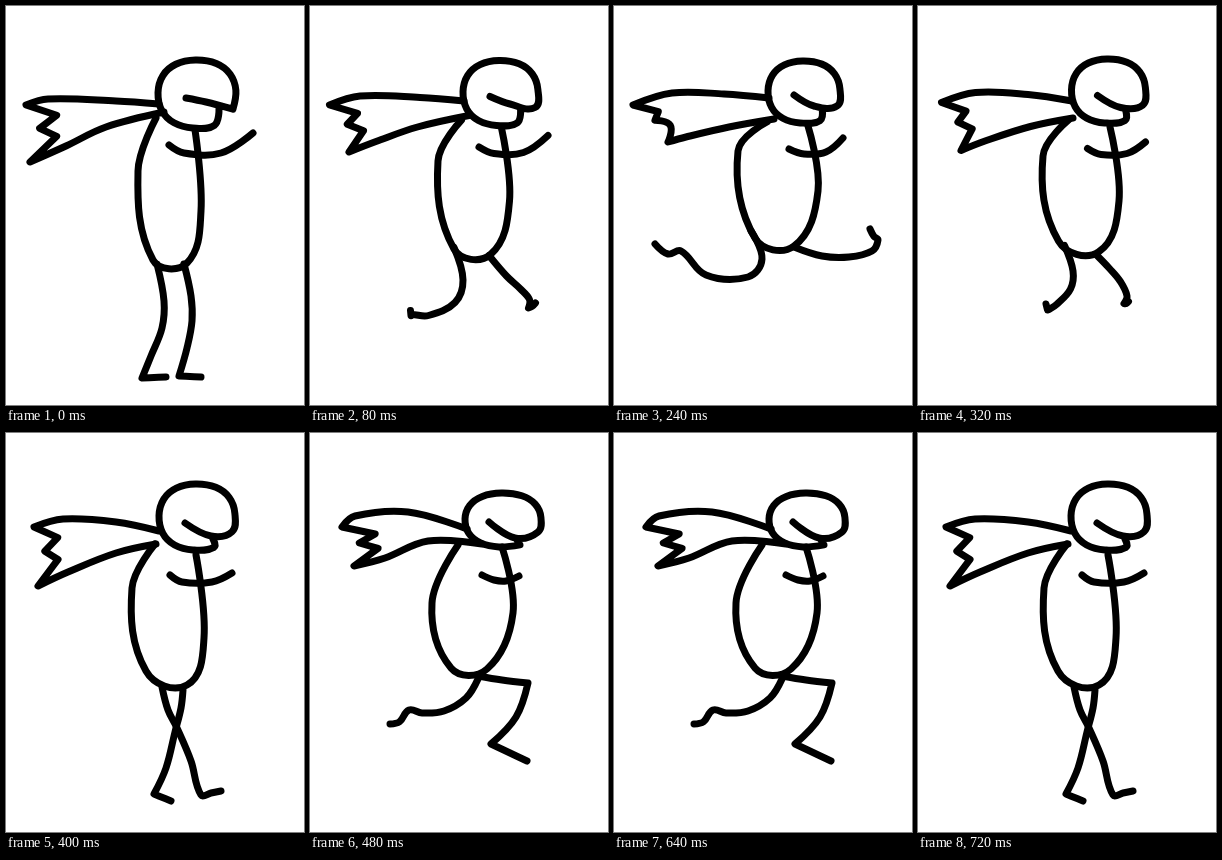
Animation of 298x399 px, one loop 0.76 s. Source, as an HTML page with a canvas:

```html
<!DOCTYPE html>
<html lang="en">
<head>
<meta charset="utf-8">
<title>Runner</title>
<style>
  html, body { margin: 0; width: 100%; height: 100%; overflow: hidden; background: #fff; }
  canvas { display: block; }
</style>
</head>
<body>
<canvas id="stage" width="298" height="399"></canvas>
<script>
const STEP = 40, STEPS = 19;
const ctx = document.getElementById('stage').getContext('2d');

const points = text => text.split(' ').map(p => p.split(',').map(Number));
const lerp = (a, b, k) => a + (b - a) * k;
const mixPoints = (a, b, k) => a.map((p, i) => p.map((v, j) => lerp(v, b[i][j], k)));

// Mouth line running into an oval that ends at the jaw.
function head([cx, cy, rx, ry], text) {
  const [mouth, lip, jaw] = points(text);
  const round = v => Math.sign(v) * Math.abs(v) ** 0.9;
  const oval = Array.from({ length: 12 }, (_, i) => {
    const a = lerp(0.42, 1.15 - 2 * Math.PI, i / 11);
    return [cx + rx * round(Math.cos(a)), cy + ry * round(Math.sin(a))];
  });
  return [mouth, lip, ...oval, jaw];
}

// Cloth between its upper and lower edge, with a torn end.
function scarf(depth, upper, lower) {
  const top = points(upper), low = points(lower);
  const tip = top[top.length - 1];
  const tears = [[0.18, 1], [0.41, 0.4], [0.55, 0.95]].map(([k, inset]) =>
    [lerp(tip[0], low[0][0], k) + depth * inset, lerp(tip[1], low[0][1], k)]);
  return [...top, ...tears, ...low];
}

// Hip to toe; a foot pointing backwards sags.
function leg(text) {
  const pts = points(text), toe = pts.pop();
  const ankle = pts[pts.length - 1];
  const sag = Math.max(0, ankle[0] - toe[0]) / 4;
  return [...pts, [lerp(ankle[0], toe[0], 0.5), lerp(ankle[1], toe[1], 0.5) + sag], toe];
}

const stand = {
  head: head([191, 88, 39, 34], '180,92 200,96 213,103'),
  scarf: scarf(30, '153,98 110,95 42,93 20,99', '24,156 60,140 100,121 158,106'),
  body: points('150,112 132,165 147,254 181,257 195,205 189,124'),
  arm: points('163,139 178,147 215,147 247,127'),
  legL: leg('151,258 158,295 156,322 145,350 136,372 160,371'),
  legR: leg('178,258 185,290 186,315 181,342 173,370 195,371')
};

const leap = {
  head: head([190, 86, 36, 31], '180,89 200,100 208,102'),
  scarf: scarf(19, '155,92 110,88 58,87 19,99', '54,136 72,131 115,121 160,113'),
  body: points('153,116 124,145 141,232 180,240 204,185 194,120'),
  arm: points('175,143 190,148 212,146 229,132'),
  legL: leg('137,225 148,253 134,271 92,269 67,245 41,238'),
  legR: leg('180,241 208,250 235,251 258,245 264,234 256,223')
};

const cross = {
  head: head([191, 84, 38, 33], '179,90 205,103 207,106'),
  scarf: scarf(23, '153,98 110,89 57,86 28,94', '32,153 62,139 110,120 150,111'),
  body: points('149,111 126,155 140,238 181,252 198,205 190,122'),
  arm: points('164,142 176,149 206,149 226,140'),
  legL: leg('156,254 162,277 171,295 185,328 195,362 215,358'),
  legR: leg('177,257 175,275 169,299 160,335 148,361 165,368')
};

const land = {
  head: head([193, 87, 38, 27], '179,89 205,105 207,107'),
  scarf: scarf(31, '157,96 98,79 45,83 32,94', '44,133 75,125 118,108 172,111'),
  body: points('148,112 122,170 141,235 177,236 203,180 192,114'),
  arm: points('172,142 184,147 196,148 209,143'),
  legL: leg('168,243 192,247 218,250 206,284 181,311 217,328'),
  legR: leg('168,246 156,265 134,278 112,280 99,277 80,291')
};

const lift = {
  head: head([195, 88, 37, 28], '181,89 205,106 208,108'),
  scarf: scarf(25, '160,97 125,77 80,74 49,92', '54,126 80,121 120,109 170,113'),
  body: points('156,113 125,165 145,232 178,231 200,180 196,117'),
  arm: points('176,141 186,148 210,147 223,137'),
  legL: leg('165,239 195,233 225,221 207,256 188,290 228,290'),
  legR: leg('156,237 152,258 128,274 104,270 91,256 59,259')
};

const blend = (a, b, k) =>
  Object.fromEntries(Object.keys(a).map(part => [part, mixPoints(a[part], b[part], k)]));

// The height of each stride overshoots its pose a little.
const stretch = blend(cross, leap, 1.1);
const peak = blend(land, lift, 1.4);

const keys = [
  [0, stand], [4, leap], [5, stretch], [6, leap], [10, cross], [12, land],
  [13, lift], [14, peak], [15, lift], [16, land], [18, cross], [STEPS, stand]
];

// Smooth curve through the points that stays sharp at turns over 90 degrees.
function stroke(pts) {
  const handle = (i, len, dir) => {
    const [x, y] = pts[i], a = pts[i - 1], b = pts[i + 1];
    if (!a || !b || (x - a[0]) * (b[0] - x) + (y - a[1]) * (b[1] - y) < 0) return [x, y];
    const dx = b[0] - a[0], dy = b[1] - a[1];
    const s = dir * len * 0.36 / Math.hypot(dx, dy);
    return [x + dx * s, y + dy * s];
  };
  ctx.beginPath();
  ctx.moveTo(...pts[0]);
  for (let i = 1; i < pts.length; i++) {
    const [x0, y0] = pts[i - 1], [x, y] = pts[i];
    const len = Math.hypot(x - x0, y - y0);
    ctx.bezierCurveTo(...handle(i - 1, len, 1), ...handle(i, len, -1), x, y);
  }
  ctx.stroke();
}

function draw(step) {
  const n = keys.findIndex(([at]) => at > step);
  const [t0, from] = keys[n - 1], [t1, to] = keys[n];
  ctx.fillStyle = '#fff';
  ctx.fillRect(0, 0, 298, 399);
  ctx.strokeStyle = '#000';
  ctx.lineWidth = 7;
  ctx.lineCap = ctx.lineJoin = 'round';
  Object.values(blend(from, to, (step - t0) / (t1 - t0))).forEach(stroke);
}

const start = performance.now();
function tick() {
  draw(Math.floor((performance.now() - start) / STEP) % STEPS);
  requestAnimationFrame(tick);
}
tick();
</script>
</body>
</html>
```
